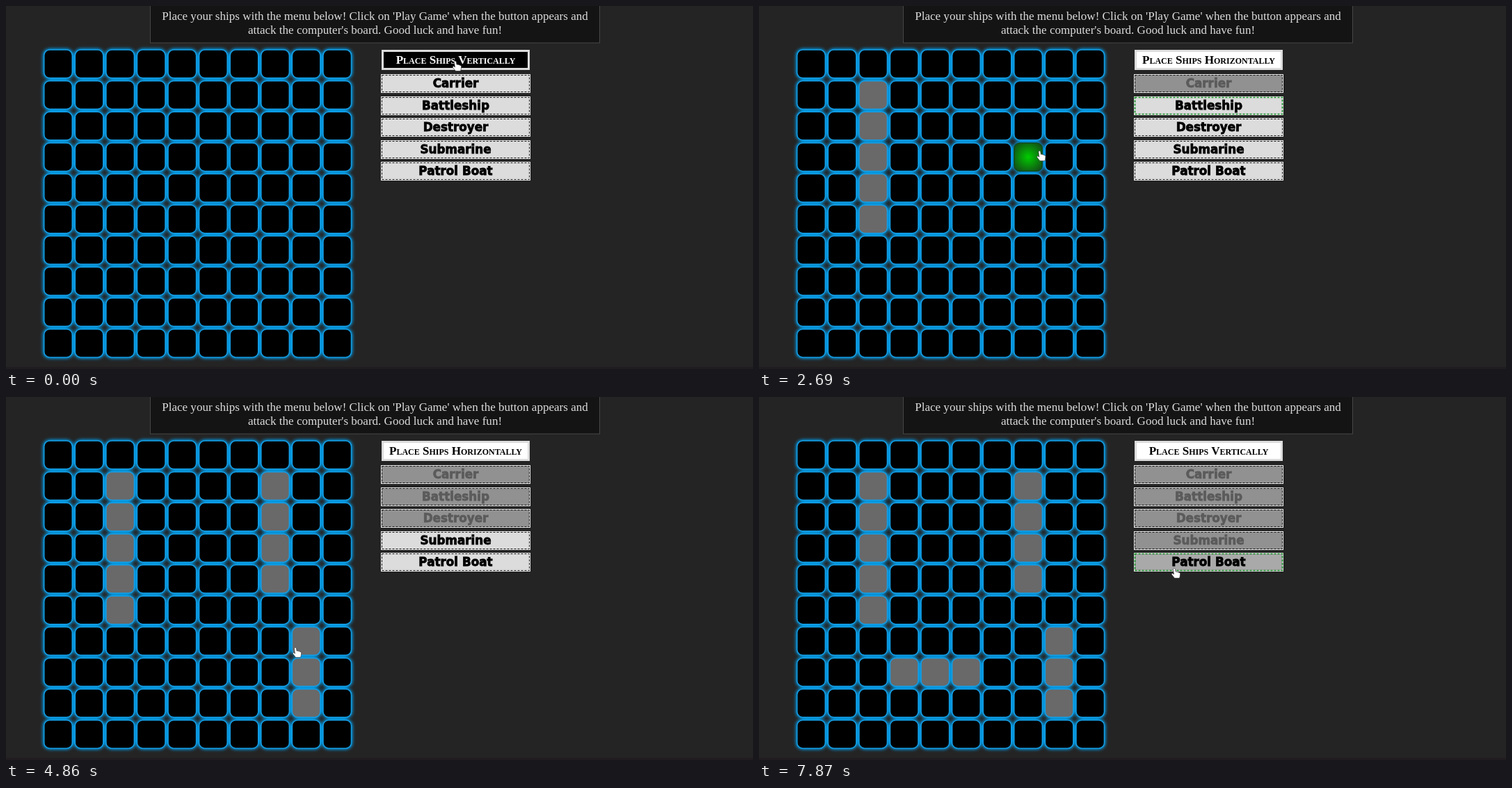
Recreate the animation shown at these times as an HTML page. Size 1074 by 522 pixels, loop 8 s.

```html
<!DOCTYPE html>
<html lang="en">
<head>
<meta charset="utf-8">
<title>Ship placement</title>
<style>
  html, body { margin: 0; width: 100%; height: 100%; overflow: hidden; background: #242424; }
  svg { display: block; width: 1074px; height: 522px; }
  text { text-anchor: middle; }
  .intro, .turn { font: 17.06px "Liberation Serif", "Times New Roman", serif; }
  .intro { fill: #dcdcdc; }
  .turn { font-weight: bold; font-variant: small-caps; }
  .ship { font: bold 16.8px "DejaVu Sans", sans-serif; stroke-width: .8; }
</style>
</head>
<body>
<svg id="stage" viewBox="0 0 1074 522" xmlns="http://www.w3.org/2000/svg">
  <defs>
    <radialGradient id="aim" r=".66">
      <stop offset="0" stop-color="#00cc00"/>
      <stop offset="1" stop-color="#144518"/>
    </radialGradient>
    <filter id="blur" x="-5%" y="-5%" width="110%" height="110%">
      <feGaussianBlur stdDeviation="2"/>
    </filter>
  </defs>
  <rect width="1074" height="522" fill="#242424"/>
  <rect y="519" width="1074" height="3" fill="#211c1f"/>
  <rect x="207.5" y="-5" width="646" height="58" fill="#141414" stroke="#464646"/>
  <text class="intro" x="530.5" y="20">Place your ships with the menu below! Click on 'Play Game' when the button appears and</text>
  <text class="intro" x="530.5" y="40">attack the computer's board. Good luck and have fun!</text>
</svg>
<script>
const stage = document.getElementById('stage');
const LOOP = 8000, STEP = 90, FADE = 300;

function add(tag, attrs, parent = stage) {
  const el = document.createElementNS('http://www.w3.org/2000/svg', tag);
  set(el, attrs);
  parent.appendChild(el);
  return el;
}
function set(el, attrs) {
  for (const k in attrs) el.setAttribute(k, attrs[k]);
}
function square(x, y, size, rx, parent) {
  return add('rect', { x: x - size / 2, y: y - size / 2, width: size, height: size, rx }, parent);
}
const clamp = v => Math.max(0, Math.min(1, v));

// Places on the stage; fractions lie between cells or menu rows
const cell = (c, r) => [75 + 44.58 * c, 83.3 + 44.62 * r];
const rowTop = i => Math.round(98 + 31.6 * i);
const item = i => [597, rowTop(i) + 22];
const button = [646, 79];

// Board
const glow = add('g', { filter: 'url(#blur)', fill: '#00a2f2' });
const board = add('g', { 'stroke-width': 1.5 });
const cells = [];
for (let r = 0; r < 10; r++) {
  for (let c = 0; c < 10; c++) {
    const [x, y] = cell(c, r);
    square(x, y, 44, 10, glow);
    cells.push({ el: square(x, y, 40.5, 8, board), r, c, x, y });
  }
}

// Direction button
const turnBox = add('rect', { x: 541.5, y: 64.5, width: 210, height: 26, stroke: '#dcdcdc', 'stroke-width': 3 });
const turnText = add('text', { class: 'turn', x: 646.5, y: 83 });

// Fleet: pick and place are the moments of the two clicks
const fleet = [
  { name: 'Carrier', size: 5, r: 1, c: 2, pick: 590, place: 1630 },
  { name: 'Battleship', size: 4, r: 1, c: 7, pick: 2510, place: 3210 },
  { name: 'Destroyer', size: 3, r: 6, c: 8, pick: 4040, place: 4860 },
  { name: 'Submarine', size: 3, r: 7, c: 3, flat: true, pick: 5490, place: 7120 },
  { name: 'Patrol Boat', pick: 7870, place: Infinity }
];
fleet.forEach((s, i) => {
  s.top = rowTop(i);
  s.box = add('rect', { x: 539.5, y: s.top + .5, width: 214, height: 26, stroke: '#f2f2f2' });
  s.dash = add('rect', { x: 540.5, y: s.top + 1.5, width: 212, height: 24, fill: 'none', 'stroke-dasharray': '3 2' });
  s.label = add('text', { class: 'ship', x: 646.5, y: s.top + 19 });
  s.label.textContent = s.name;
});

const hand = add('path', {
  d: 'M-1.6 1.2Q0-1 1.4 1.2L2 5.2Q3.2 4.4 4.2 5.6Q5.6 5 6.4 6.3Q8.4 6 8.7 8L8.2 12.2L7.4 14.5H.6L-3.6 9.4Q-4.4 7.2-2.2 7.6L-.6 9Z',
  fill: '#fff', stroke: '#222', 'stroke-width': .6
});

// Stops of the pointer
const tour = [
  [0, button], [100, button], [590, item(0)],
  [1630, cell(2, 1)], [2050, cell(8.14, .67)], [2510, item(1)],
  [2890, cell(2.54, 4.2)], [3210, cell(7, 1.2)], [3310, cell(7.6, 1.79)],
  [3750, cell(8.45, 3.3)], [4040, item(2.15)], [4230, cell(8.48, 5.3)],
  [4380, cell(8.87, 2.6)], [4700, cell(7.65, 6.2)], [4860, cell(7.65, 6.2)],
  [5410, item(3)], [5570, item(3)], [5950, button], [6150, button],
  [6530, cell(4.08, 5.75)], [7120, cell(2.6, 7.2)], [7510, cell(7.45, 4.2)],
  [7870, item(4)], [LOOP, item(4)]
];

// Each leg runs in even steps from stop to stop
function pointer(t) {
  const i = tour.findIndex(s => s[0] > t);
  const [t0, from] = tour[i - 1], [t1, to] = tour[i];
  const p = Math.floor((t - t0) / STEP) * STEP / (t1 - t0);
  return from.map((v, k) => v + (to[k] - v) * p);
}

// Darkness of the direction button: left once, then visited again
function heat(t) {
  const first = clamp((550 - t) / FADE);
  const again = clamp(Math.min(t - 5850, 6540 - t) / FADE);
  return Math.max(first, again);
}

function gray(v) {
  v = Math.round(255 * v);
  return `rgb(${v},${v},${v})`;
}
function covers(s, { c, r }) {
  const right = c - s.c, down = r - s.r;
  const [along, across] = s.flat ? [right, down] : [down, right];
  return across === 0 && along >= 0 && along < s.size;
}

function draw(t) {
  const [x, y] = pointer(t);
  const tip = y + 2;
  set(hand, { transform: `translate(${x} ${y})` });

  const dark = heat(t);
  set(turnBox, { fill: gray(1 - dark) });
  set(turnText, { fill: gray(dark) });
  turnText.textContent = 'Place Ships ' + (t >= 100 && t < 6050 ? 'Horizontally' : 'Vertically');

  for (const s of fleet) {
    const gone = t >= s.place;
    const picked = t >= s.pick && !gone;
    const over = x > 539 && x < 754 && tip > s.top && tip < s.top + 27;
    const ink = gone ? '#5b5b5b' : '#000';
    set(s.box, { fill: gone ? '#919191' : over ? '#a9a9a9' : '#dcdcdc' });
    set(s.dash, { stroke: picked ? '#0b8a1c' : '#111', 'stroke-width': picked ? 1.7 : 1 });
    set(s.label, { fill: ink, stroke: ink });
  }

  const placed = fleet.filter(s => t >= s.place);
  for (const q of cells) {
    const ship = placed.some(s => covers(s, q));
    const over = !ship && Math.abs(x - q.x) < 20.5 && Math.abs(tip - q.y) < 20.5;
    set(q.el, {
      fill: ship ? '#696969' : over ? 'url(#aim)' : '#000',
      stroke: over ? '#12481f' : '#149ee6'
    });
  }
}

function tick() {
  draw(performance.now() % LOOP);
  requestAnimationFrame(tick);
}
tick();
</script>
</body>
</html>
```
